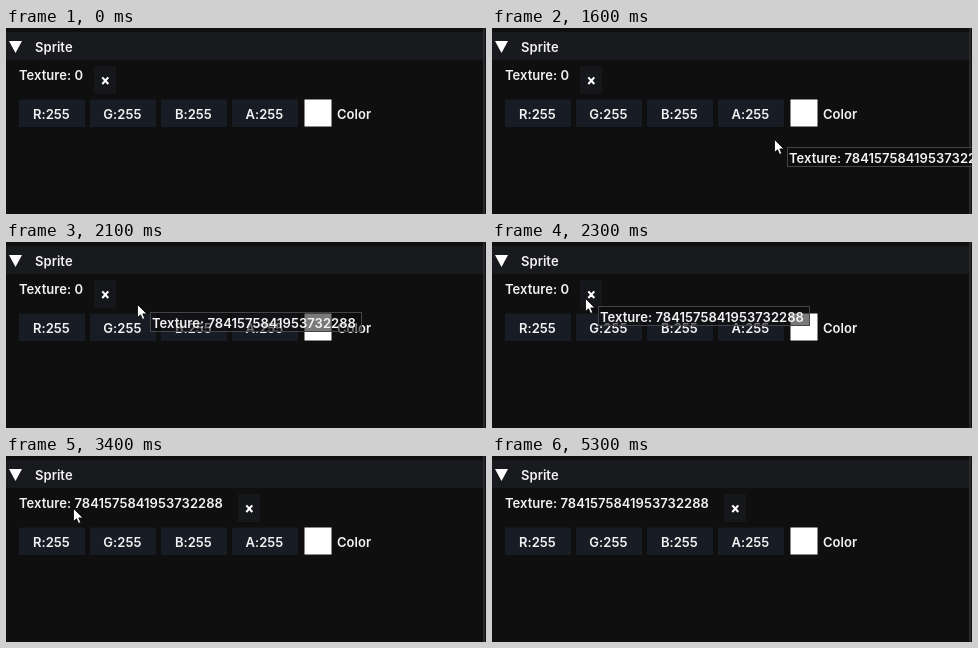
An HTML page that plays this animation: 480 px wide and 186 px high, repeating every 8700 ms.

```html
<!DOCTYPE html>
<html lang="en">
<head>
<meta charset="utf-8">
<title>Sprite inspector</title>
<style>
  html, body { margin: 0; width: 100%; height: 100%; overflow: hidden; background: #0f0f0f; }
  svg { display: block; width: 100vw; height: 100vh; }
  text { font: 600 13px Inter, Roboto, sans-serif; letter-spacing: .04px; fill: #f2f2f2; white-space: pre; }
</style>
</head>
<body>
<svg viewBox="0 0 480 186">
  <rect width="480" height="186" fill="#0f0f0f"/>
  <rect y="4" width="477" height="28" fill="#191a1e"/>
  <rect x="477" width="2" height="186" fill="#28282c"/>
  <path d="M3 13H16L9.5 25Z" fill="#fff"/>
  <text x="29" y="24">Sprite</text>
  <text id="label" x="13" y="52"></text>
  <g id="clear">
    <rect x="-11" y="38" width="22" height="28" rx="1" fill="#15171b"/>
    <path d="M-2.7 49.4L3.3 56M3.3 49.4L-2.7 56" stroke="#fff" stroke-width="2.1"/>
  </g>
  <g id="channels"></g>
  <rect x="298.5" y="71.5" width="27" height="27" fill="#fff"/>
  <text x="331" y="90.5">Color</text>
  <rect id="target" x="10.5" y="35.5" width="70" height="23" fill="none" stroke="#e2de12" stroke-width="2"/>
  <g id="pointer">
    <g id="tip">
      <rect x="13.5" y="8.5" width="211" height="19" fill="#0c0c0c" fill-opacity=".55" stroke="#444448"/>
      <text x="15" y="23.5"></text>
    </g>
    <path d="M.5 .5V13.5L3.5 10.8L5.6 15.4L7.8 14.4L5.8 9.9H10Z" fill="#fff" stroke="#000" stroke-width=".8"/>
  </g>
</svg>
<script>
const LOOP = 8700, STEP = 100, ENTER = 1000, DROP = 3400, EXIT = 5300;
const ASSET = "Texture: 7841575841953732288";
const $ = id => document.getElementById(id);

$("channels").innerHTML = [..."RGBA"].map((name, i) => {
  const x = 13 + i * 71;
  return `<rect x="${x}" y="71.5" width="66" height="27.5" rx="1" fill="#181c25"/>
    <text x="${x + 32.4}" y="90.5" text-anchor="middle">${name}:255</text>`;
}).join("");
$("tip").querySelector("text").textContent = ASSET;

// Pointer key points: time, x, y
const path = [
  [1000, 390, 180], [1600, 282, 111], [1900, 183, 73], [2300, 93, 56], [2600, 64, 53],
  [2800, 67, 52], [4000, 67, 52], [4500, 115, 87], [4900, 228, 148], [5200, 323, 180]
];
const last = path.length - 1;

const rate = (i, k) => (path[i + 1][k] - path[i][k]) / (path[i + 1][0] - path[i][0]);

// Harmonic mean of the neighbouring rates keeps the curve from overshooting
function slope(i, k) {
  const a = rate(Math.max(0, i - 1), k), b = rate(Math.min(last - 1, i), k);
  return a * b > 0 ? 2 * a * b / (a + b) : 0;
}

function pointerAt(t) {
  t = Math.min(Math.max(t, path[0][0]), path[last][0]);
  const i = Math.max(0, path.findIndex(p => p[0] >= t) - 1);
  const a = path[i], b = path[i + 1], span = b[0] - a[0];
  const u = (t - a[0]) / span, v = 1 - u;
  return [1, 2].map(k => Math.round(
    a[k] * (1 + 2 * u) * v * v + b[k] * u * u * (3 - 2 * u) +
    span * u * v * (slope(i, k) * v - slope(i + 1, k) * u)));
}

const show = (id, on) => $(id).setAttribute("visibility", on ? "visible" : "hidden");

function draw(time) {
  const t = Math.floor(time % LOOP / STEP) * STEP;
  const dropped = t >= DROP, active = t >= ENTER && t < EXIT;
  const [x, y] = pointerAt(t);
  $("label").textContent = dropped ? ASSET : "Texture: 0";
  $("clear").setAttribute("transform", `translate(${dropped ? 243 : 99} 0)`);
  $("pointer").setAttribute("transform", `translate(${x} ${y})`);
  show("pointer", active);
  show("tip", active && !dropped);
  show("target", active && !dropped && x < 77);
}

const start = performance.now();
function tick() {
  draw(performance.now() - start);
  requestAnimationFrame(tick);
}
tick();
</script>
</body>
</html>
```
